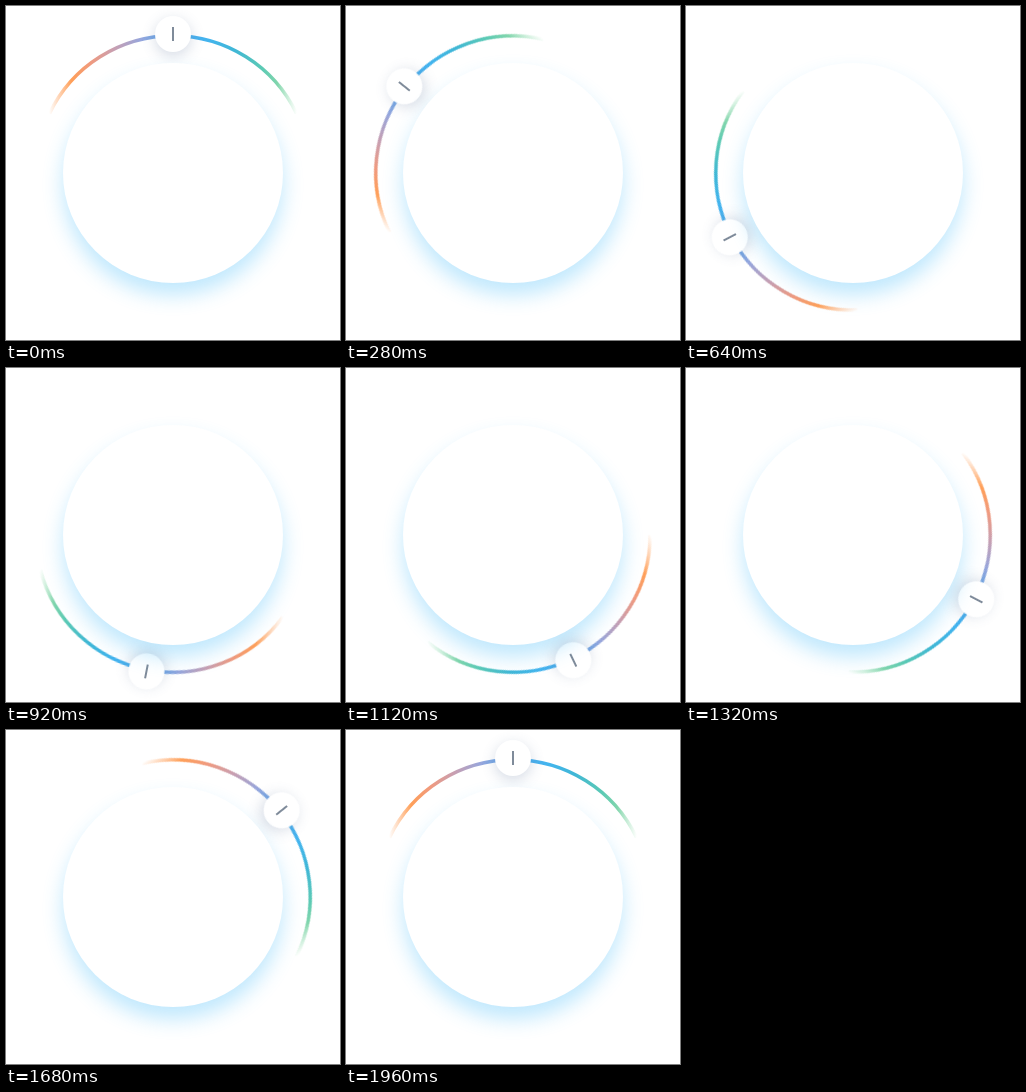
These frames come from a looping animation (334x334 px, 2000 ms). An HTML page:

```html
<!DOCTYPE html>
<html lang="en">
<head>
<meta charset="utf-8">
<title>Orbiting dial</title>
<style>
  html, body { margin: 0; width: 100%; height: 100%; overflow: hidden; background: #fff; }
  .stage { position: relative; width: 334px; height: 334px; overflow: hidden; }

  .orbit {
    position: absolute;
    inset: 0;
    animation: orbit 2s steps(50, jump-none) infinite;
  }
  .orbit svg { position: absolute; inset: 0; }

  .knob {
    position: absolute;
    left: 149px;
    top: 9.5px;
    width: 36px;
    height: 36px;
    border-radius: 50%;
    background: #fff;
    box-shadow: 0 4px 14px rgba(80, 105, 145, .24);
  }
  .knob::after {
    content: "";
    position: absolute;
    left: 17.3px;
    top: 11.5px;
    width: 1.4px;
    height: 14px;
    background: #7f8b9a;
  }

  .disc {
    position: absolute;
    left: 57px;
    top: 57px;
    width: 220px;
    height: 220px;
    border-radius: 50%;
    background: #fff;
    box-shadow: 0 12px 20px rgba(64, 184, 250, .33);
  }

  @keyframes orbit {
    from { transform: rotate(0deg); }
    to { transform: rotate(-360deg); }
  }
</style>
</head>
<body>
<div class="stage">
  <div class="orbit">
    <svg width="334" height="334" viewBox="0 0 334 334">
      <defs>
        <linearGradient id="spectrum" gradientUnits="userSpaceOnUse" x1="43" y1="0" x2="291" y2="0">
          <stop offset="0" stop-color="#ffa25f" stop-opacity="0"/>
          <stop offset=".09" stop-color="#ff9f58"/>
          <stop offset=".17" stop-color="#ef9a80"/>
          <stop offset=".26" stop-color="#c99fb0"/>
          <stop offset=".37" stop-color="#97a6dc"/>
          <stop offset=".48" stop-color="#58aaee"/>
          <stop offset=".64" stop-color="#43b4ee"/>
          <stop offset=".75" stop-color="#40b7d6"/>
          <stop offset=".86" stop-color="#5ccab4"/>
          <stop offset=".92" stop-color="#80d5ac"/>
          <stop offset="1" stop-color="#9fe0b4" stop-opacity="0"/>
        </linearGradient>
      </defs>
      <path d="M43.5 107.5A137 137 0 0 1 290.5 107.5" fill="none" stroke="url(#spectrum)" stroke-width="3.5"/>
    </svg>
    <div class="knob"></div>
  </div>
  <div class="disc"></div>
</div>
</body>
</html>
```
